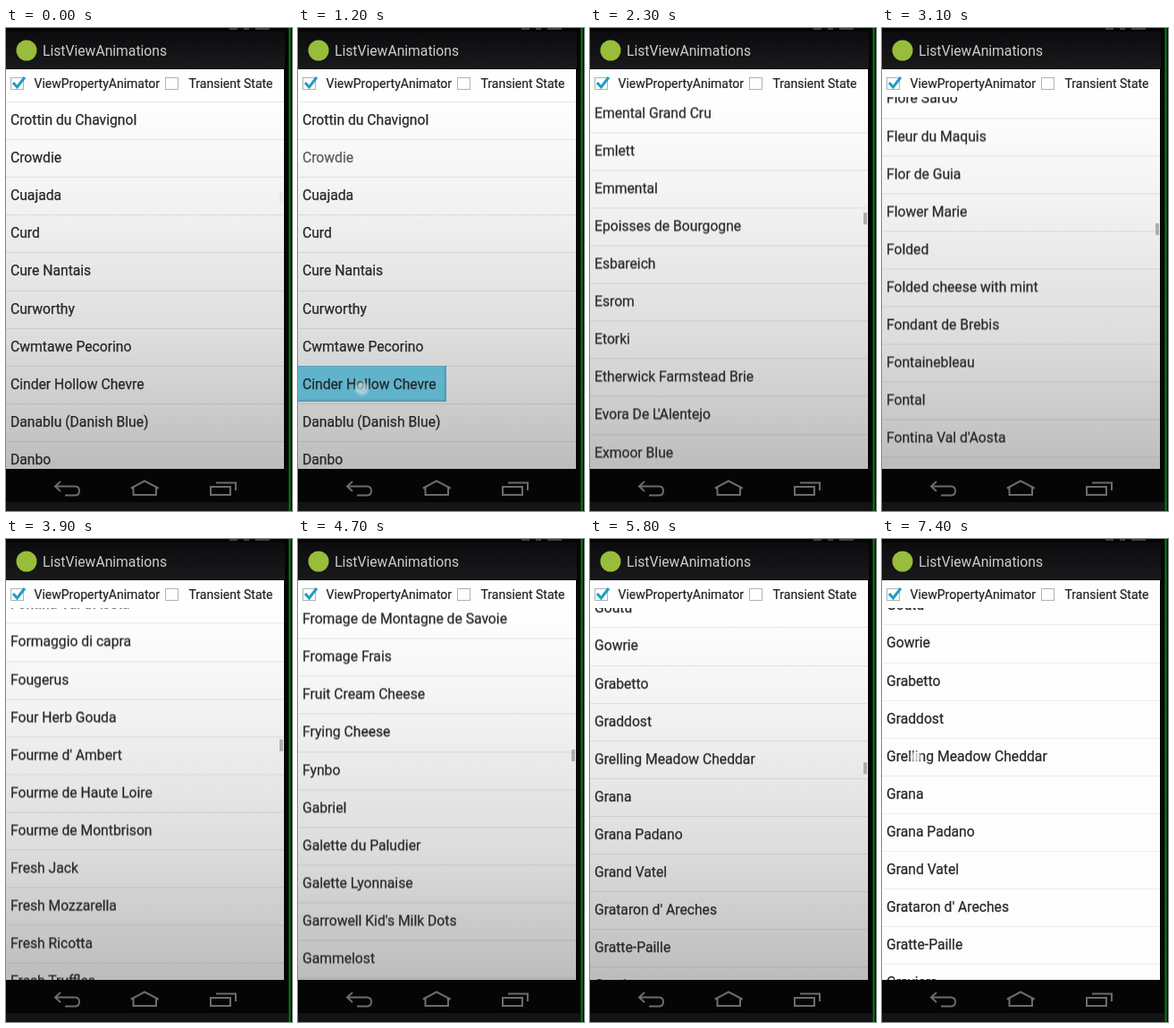
An HTML page that plays this animation: 320x539 px, repeating every 7.5 s.

```html
<!DOCTYPE html>
<html lang="en">
<head>
<meta charset="utf-8">
<style>
html, body { margin: 0; width: 100%; height: 100%; overflow: hidden; background: #050505; }
#stage { position: relative; width: 320px; height: 539px; overflow: hidden; background: #050505;
  font-family: Roboto, sans-serif; color: #262626; filter: blur(.3px); }
#stage > * { position: absolute; }
#bar { left: 0; top: 4px; width: 312px; height: 41px; background: linear-gradient(#0c0c0e, #19191b); }
#title { left: 41px; top: 15px; font-size: 15.7px; line-height: 21px; color: #cdcdcd; }
#page { left: 0; top: 46px; width: 311px; height: 446px; overflow: hidden;
  background: linear-gradient(#fefefe 8%, #f1f1f1 35%, #dcdcdc 68%, #bcbcbc); }
#glare { position: absolute; inset: 0; background: #fdfdfd; opacity: 0; }
#view { position: absolute; left: 0; top: 31px; width: 311px; height: 415px; overflow: hidden; }
#list { position: absolute; left: 0; top: 5px; width: 311px; will-change: transform; }
.row { position: absolute; left: 0; width: 311px; height: 42.1px; line-height: 42.1px; padding-left: 5px;
  box-sizing: border-box; font-size: 15.7px; white-space: nowrap;
  -webkit-text-stroke: .25px currentColor; box-shadow: inset 0 1px rgba(0, 0, 0, .09); }
#press { position: absolute; left: 0; top: 295px; width: 166px; height: 40px; background: #5fb3cb;
  box-shadow: inset -2px -2px 2px rgba(60, 110, 125, .35); }
.dot { position: absolute; border-radius: 50%; filter: blur(1.5px); }
#touch { left: 64px; top: 395px; width: 15px; height: 15px; background: rgba(205, 222, 228, .65); }
#lift { left: 32px; top: 237px; width: 12px; height: 12px; background: rgba(253, 253, 253, .75); }
#thumb { left: 305.5px; top: 183px; width: 4px; height: 13px; background: #a3a3a6; }
.opt { top: 53px; font-size: 14px; line-height: 18px; white-space: nowrap; color: #222;
  -webkit-text-stroke: .2px currentColor; }
#edge { left: 315.5px; top: 0; width: 3px; height: 539px; background: linear-gradient(90deg, #052d0a, #0b7a20, #052d0a); }
#foot { left: 0; top: 529px; width: 316px; height: 10px; background: #141416; }
svg { left: 0; top: 0; }
</style>
</head>
<body>
<div id="stage">
  <div id="bar"></div>
  <div id="title">ListViewAnimations</div>
  <div id="page">
    <div id="glare"></div>
    <div id="view"><div id="list"><div id="press"></div></div></div>
  </div>
  <div class="dot" id="touch"></div>
  <div class="dot" id="lift"></div>
  <div id="thumb"></div>
  <div class="opt" style="left:31.5px">ViewPropertyAnimator</div>
  <div class="opt" style="left:204.5px">Transient State</div>
  <div id="edge"></div>
  <div id="foot"></div>
  <svg width="320" height="539" fill="none">
    <circle cx="23" cy="25" r="11.5" fill="#98bd3a"/>
    <path d="M250 1h9M266 1h6M279 1h16" stroke="#555" stroke-width="1.5"/>
    <rect x="5.5" y="55.5" width="14" height="13" stroke="#a9b4b8"/>
    <path d="M8 61l4.5 5L21 55" stroke="#1f9cc4" stroke-width="3"/>
    <rect x="178.5" y="55.5" width="14" height="13" stroke="#b2b2b2"/>
    <g stroke="#6c6c6c" stroke-width="2">
      <path d="M61 506l-6 5.500 6 5.500M56 511.500H77q5 0 5 5t-5 5H66"/>
      <path d="M140 513.500l15-8 15.500 8h-2.500v7.500h-25.500v-7.500z"/>
      <path d="M229 512h22v9h-22zM235 507.500h22v8.500"/>
    </g>
  </svg>
</div>
<script>
const LOOP = 7500, STEP = 100, PITCH = 42.1;
const names = `Crottin du Chavignol|Crowdie|Cuajada|Curd|Cure Nantais|Curworthy|Cwmtawe Pecorino|Cinder Hollow Chevre
Danablu (Danish Blue)|Danbo|Danish Fontina|Daralagjazsky|Dauphin|Delice des Fiouves|Dellany Hollow Drum|Derby
Dessertnyj Belyj|Devon Blue|Devon Garland|Dolcelatte|Doolin|Doppelrhamstufel|Dorset Blue Vinney|Double Gloucester
Double Worcester|Dreux a la Feuille|Dry Jack|Dapplewell|Dunbarra|Dunlop|Dunmarsh Blue|Duroblando|Durrus
Dutch Mimolette (Commissiekaas)|Edam|Edelpilz|Emental Grand Cru|Emlett|Emmental|Epoisses de Bourgogne|Esbareich
Esrom|Etorki|Etherwick Farmstead Brie|Evora De L'Alentejo|Exmoor Blue|Extra Creme|Feta|Feta (Australian)|Figue
Filetta|Fin-de-Siecle|Firnlund Swiss|Finn|Fiore Sardo|Fleur du Maquis|Flor de Guia|Flower Marie|Folded
Folded cheese with mint|Fondant de Brebis|Fontainebleau|Fontal|Fontina Val d'Aosta|Formaggio di capra|Fougerus
Four Herb Gouda|Fourme d' Ambert|Fourme de Haute Loire|Fourme de Montbrison|Fresh Jack|Fresh Mozzarella
Fresh Ricotta|Fresh Truffles|Fribourgeois|Friesekaas|Friesian|Friesla|Frinault|Fromage a Raclette|Fromage Corse
Fromage de Montagne de Savoie|Fromage Frais|Fruit Cream Cheese|Frying Cheese|Fynbo|Gabriel|Galette du Paludier
Galette Lyonnaise|Garrowell Kid's Milk Dots|Gammelost|Gaperon a l'Ancienne|Garrotxa|Gastanberra|Geitost
Gillmere Blue|Gjetost|Gloucester|Golden Loop|Gorgonzola|Gornyaltajski|Gentle Green|Gouda|Goutu|Gowrie|Grabetto
Graddost|Grelling Meadow Cheddar|Grana|Grana Padano|Grand Vatel|Grataron d' Areches|Gratte-Paille|Graviera`.split(/[|\n]/);

// start ms, end ms, offset reached
const flings = [
  [1200, 1780, 760], [1780, 2300, 1523.6], [2320, 3100, 2297.5], [3720, 4150, 2850],
  [4210, 4700, 3423.6], [4740, 5800, 4361.9], [6850, 7300, 4365.2]
];

const el = id => document.getElementById(id);
const clamp = x => Math.min(1, Math.max(0, x));
const ramp = (t, a, b) => clamp((t - a) / (b - a));
const within = (t, a, b) => t >= a && t < b ? 1 : 0;

const rows = names.map((name, i) => {
  const row = document.createElement('div');
  row.className = 'row';
  row.textContent = name;
  row.style.top = i * PITCH + 'px';
  el('list').append(row);
  return row;
});

function scrollAt(t) {
  let y = 0;
  for (const [start, end, to] of flings) {
    if (t <= start) break;
    y += (to - y) * (1 - Math.pow(1 - ramp(t, start, end), 2.2));
  }
  return y;
}

function draw(now) {
  const t = Math.floor(now % LOOP / STEP) * STEP;
  const y = scrollAt(t);
  el('list').style.transform = `translateY(${-y}px)`;
  el('thumb').style.transform = `translateY(${y * .0152}px)`;
  el('thumb').style.opacity = t < 1300 ? .12 * (1 - ramp(t, 0, 300)) : .85 * (1 - ramp(t, 6100, 6500));
  el('press').style.opacity = within(t, 1100, 1300);
  el('touch').style.opacity = within(t, 1000, 1300);
  el('lift').style.opacity = within(t, 6900, LOOP);
  el('glare').style.opacity = ramp(t, 6800, 7300);
  rows[1].style.color = t < 500 ? '' : t < 600 ? '#404040' : '#5c5c5c';
}

const begin = performance.now();
function tick() {
  draw(performance.now() - begin);
  requestAnimationFrame(tick);
}
tick();
</script>
</body>
</html>
```
